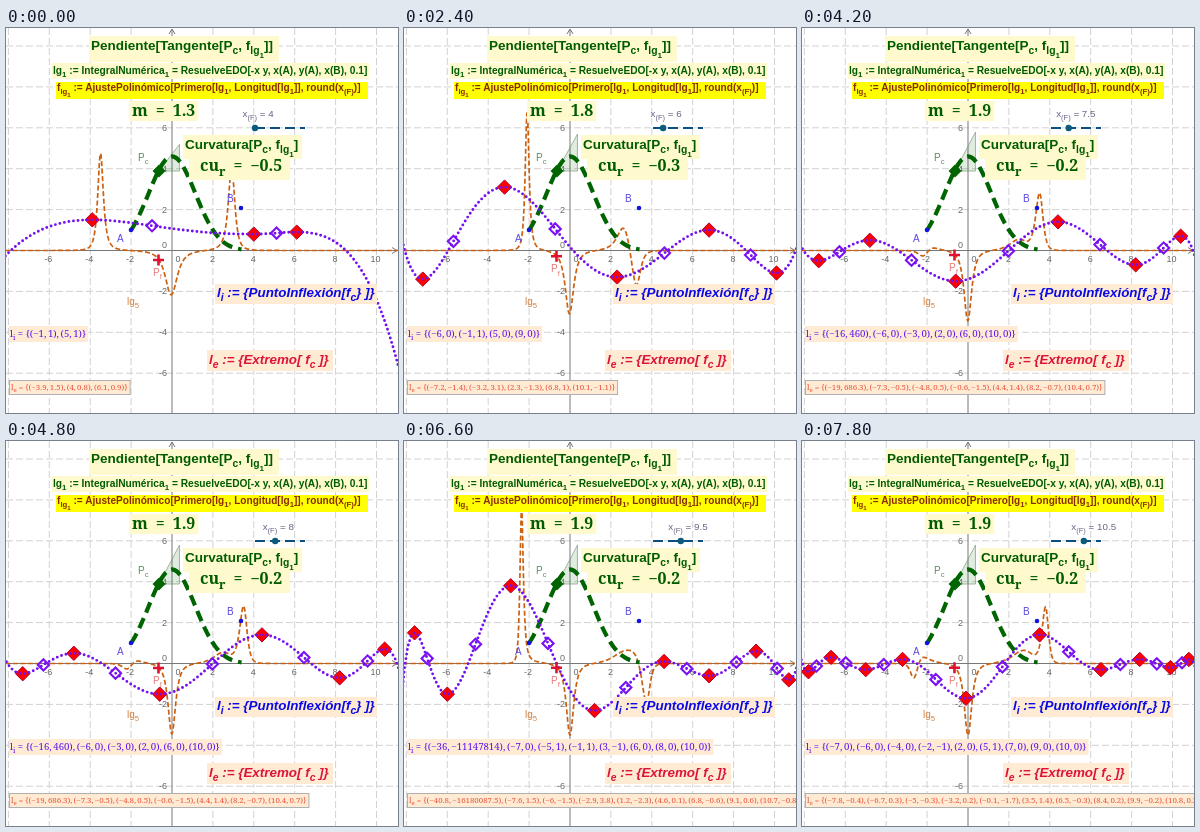
An HTML page that plays this animation: 392 by 385 pixels, repeating every 8000 ms.

```html
<!DOCTYPE html>
<html lang="es">
<head>
<meta charset="utf-8">
<style>
  html, body { margin: 0; width: 100%; height: 100%; overflow: hidden; background: #fff; }
  svg { display: block; width: 392px; height: 385px; }
  text { font-family: "Liberation Sans", Arial, sans-serif; white-space: pre; }
  .serif { font-family: "Noto Serif", serif; }
  .b { font-weight: bold; }
  .i { font-style: italic; }
  path { fill: none; }
  #grid { stroke: #d2d2d2; stroke-dasharray: 7 3; }
  #axes { stroke: #777; }
  #kappa { stroke: #cc6010; stroke-width: 1.7; stroke-dasharray: 5 2.5; }
  #bell { stroke: #006400; stroke-width: 4.2; stroke-dasharray: 11 6; }
  #curve { stroke: #7410f0; stroke-width: 2.9; stroke-linecap: round; stroke-dasharray: 0 4.6; }
  #peaks { fill: #f00; stroke: #b00030; }
  #bends { stroke: #7a12f2; stroke-width: 2.1; }
  #slope { fill: #006400; fill-opacity: .12; stroke: #7d977d; stroke-width: .7; }
  #point { fill: #006400; }
  #cross { stroke: #e01030; stroke-width: 2.6; }
  #slider { stroke: #0b4f80; stroke-width: 2.2; stroke-dasharray: 10 5; }
  .end { fill: #1414e0; }
</style>
</head>
<body>
<svg viewBox="0 0 392 385">
  <path id="grid"/><path id="axes"/><g id="ticks"></g>
  <path id="kappa"/><path id="slope"/><path id="bell"/>
  <path id="peaks"/><path id="bends"/><path id="curve"/>
  <path id="point" d="M153 136.500l6.500 6.500-6.500 6.500-6.500-6.500z"/>
  <path id="cross"/>
  <circle class="end" cx="125" cy="202" r="2.300"/>
  <circle class="end" cx="235" cy="180" r="2.300"/>
  <path id="slider" d="M249 100H299"/>
  <circle id="knob" cy="100" r="3.200" fill="#0b5c7c"/>
  <g id="labels"></g>
</svg>
<script>
const $ = id => document.getElementById(id);
const NS = 'http://www.w3.org/2000/svg';
const UNIT = 20.45, OX = 166, OY = 222.5, LEFT = -8.15, RIGHT = 11.1;
const px = x => OX + UNIT * x, py = y => OY - UNIT * y;
const set = (el, attrs) => { for (const k in attrs) el.setAttribute(k, attrs[k]); return el; };
const add = (parent, tag, attrs) => parent.appendChild(set(document.createElementNS(NS, tag), attrs));

// "|n" switches to subscript level n
function write(el, str) {
  const size = +el.getAttribute('font-size');
  const drop = [0, .32, .6], scale = [1, .77, .6];
  let level = 0;
  el.textContent = '';
  ('|0' + str).split('|').slice(1).forEach(part => {
    const next = +part[0];
    const span = add(el, 'tspan', { dy: (drop[next] - drop[level]) * size, 'font-size': scale[next] * size });
    span.textContent = part.slice(1);
    level = next;
  });
}
function label(str, x, y, size, fill, cls = '', parent = $('labels')) {
  const el = add(parent, 'text', { x, y, 'font-size': size, fill, class: cls });
  write(el, str);
  return el;
}
const box = (x, y, width, height, fill, stroke = 'none') =>
  add($('labels'), 'rect', { x, y, width, height, fill, stroke });

const toPath = pts => 'M' + pts.map(([x, y]) => px(x).toFixed(2) + ' ' + py(y).toFixed(2)).join('L');
const sample = (f, a, b, step) =>
  Array.from({ length: Math.ceil((b - a) / step) + 1 }, (_, i) => [a + i * step, f(a + i * step)]);
const diamonds = (pts, r) => pts.map(([x, y]) => `M${px(x)} ${py(y) - r}l${r} ${r}-${r} ${r}-${r}-${r}z`).join('');

const bell = x => 4.6 * Math.exp(-x * x / 2.62);
const nodes = sample(bell, -2, 3.4, .1);

// Least-squares polynomial through the bell; gives value, first and second derivative
function fitBell(degree) {
  const dot = (u, v) => u.reduce((s, e, i) => s + e * v[i], 0);
  const xs = nodes.map(p => p[0]), ys = nodes.map(p => p[1]), terms = [];
  let prev = xs.map(() => 0), cur = xs.map(() => 1), last = 1;
  for (let k = 0; k <= degree; k++) {
    const norm = dot(cur, cur);
    const a = dot(cur.map((c, i) => c * xs[i]), cur) / norm, b = k ? norm / last : 0;
    terms.push([a, b, dot(cur, ys) / norm]);
    [prev, cur] = [cur, cur.map((c, i) => (xs[i] - a) * c - b * prev[i])];
    last = norm;
  }
  return x => {
    let p = [1, 0, 0], old = [0, 0, 0], sum = [0, 0, 0];
    for (const [a, b, c] of terms) {
      sum = sum.map((s, i) => s + c * p[i]);
      [old, p] = [p, p.map((v, i) => (x - a) * v + (i && i * p[i - 1]) - b * old[i])];
    }
    return sum;
  };
}

// A polynomial is known from its extrema: they are the roots of its derivative
function throughExtrema(ext) {
  const rate = x => ext.reduce((p, [e]) => p * (x - e), 1);
  const walk = (a, b, n = 200) => {
    const h = (b - a) / n, pts = [[a, 0]];
    for (let i = 0, s = 0; i < n; i++) pts.push([a + (i + 1) * h, s += h * rate(a + (i + .5) * h)]);
    return pts;
  };
  const place = (pts, y, k) => pts.map(([x, s]) => [x, y + k * s]);
  const bends = [], gains = [];
  let pts = [];
  for (let i = 0; i + 1 < ext.length; i++) {
    const [[a, ya], [b, yb]] = ext.slice(i, i + 2);
    const raw = walk(a, b), k = (yb - ya) / raw[raw.length - 1][1];
    const gap = place(raw, ya, k);
    bends.push(gap.reduce((m, p) => Math.abs(rate(p[0])) > Math.abs(rate(m[0])) ? p : m));
    gains.push(k);
    pts = pts.concat(gap);
  }
  const first = ext[0], end = ext[ext.length - 1];
  if (first[0] > LEFT) pts = place(walk(first[0], LEFT), first[1], gains[0]).reverse().concat(pts);
  pts = pts.concat(place(walk(end[0], RIGHT), end[1], gains[gains.length - 1]));
  return { bends, pts: pts.filter(([x, y]) => x > LEFT - .2 && Math.abs(y) < 12) };
}

const list = pts =>
  ('{' + pts.map(p => `(${p.join()})`).join() + '}').replace(/-/g, '\u2212').replace(/,/g, ',\u2009');

// Extrema shown for each degree from 4 up
const scenes = [
  '-3.9,1.5 4,0.8 6.1,0.9',
  '-8.5,-0.4 -3.1,3.1 4.4,-1.4 9.4,1.4',
  '-7.2,-1.4 -3.2,3.1 2.3,-1.3 6.8,1 10.1,-1.1',
  '-7.3,-0.5 -4.8,0.5 -0.6,-1.5 4.4,1.4 8.2,-0.7 10.4,0.7',
  '-19,686.3 -7.3,-0.5 -4.8,0.5 -0.6,-1.5 4.4,1.4 8.2,-0.7 10.4,0.7',
  '-7.7,1.5 -6,-1.5 -3,3.6 1.1,-2.1 4.6,0 6.7,-0.5 9.1,0.5 10.7,-0.6',
  '-40.8,-16180087.5 -7.6,1.5 -6,-1.5 -2.9,3.8 1.2,-2.3 4.6,0.1 6.8,-0.6 9.1,0.6 10.7,-0.8',
  '-7.8,-0.4 -6.7,0.3 -5,-0.3 -3.2,0.2 -0.1,-1.7 3.5,1.4 6.5,-0.3 8.4,0.2 9.9,-0.2 10.8,0.2'
].map((str, i) => {
  const ext = str.split(' ').map(p => p.split(',').map(Number));
  const { bends, pts } = throughExtrema(ext);
  const fit = fitBell(i + 4);
  const curvature = x => { const [, d, dd] = fit(x); return dd / (1 + d * d) ** 1.5; };
  const atP = (153 - OX) / UNIT;
  return {
    paths: {
      curve: toPath(pts),
      peaks: diamonds(ext, 7.2),
      bends: diamonds(bends, 5.6),
      kappa: toPath(sample(curvature, LEFT, RIGHT, .02))
    },
    m: +fit(atP)[1].toFixed(1),
    cu: curvature(atP),
    extText: '|0l|1e|0 = ' + list(ext),
    bendText: '|0l|1i|0 = ' + list(bends.map(p => p.map(v => Math.round(v) || 0)))
  };
});

// Fixed scenery
let grid = '';
const tick = (n, x, y) => label('' + n, x, y, 9, '#666', '', $('ticks'));
for (let n = -8; n <= 10; n += 2) {
  if (!n) continue;
  grid += `M${px(n)} 0V385M0 ${py(n)}H392`;
  if (n > -8) tick(n, px(n) - (n < 0 ? 5 : n > 9 ? 6 : 3), 234);
  if (Math.abs(n) < 8) tick(n, n < 0 ? 153 : 156, py(n) + 3);
}
tick(0, 169.5, 234);
tick(0, 156, 220);
set($('grid'), { d: grid });
set($('axes'), { d: `M${OX} 385V1m-3 5l3-5 3 5M0 ${OY}H391m-5-3l5 3-5 3` });
set($('bell'), { d: toPath(nodes) });

const GREEN = '#005c00', CREAM = '#fffacd', PEACH = '#ffebd3';
label('P|1c', 132, 133, 10, '#5f8f5f');
label('A', 111, 214, 10, '#5a4ae0');
label('B', 221, 174, 10, '#5a4ae0');
label('lg|15', 121, 277, 10, '#d08040');
const crossLabel = label('P|1f', 147, 0, 10, '#e87878');
const knobLabel = label('', 0, 89, 9.8, '#668');

box(83, 8, 190, 26, CREAM);
label('Pendiente[Tangente[P|1c|0, f|1lg|21|0]]', 85, 22, 13.5, GREEN, 'b');
box(46, 35, 317, 16, CREAM);
label('lg|11|0 := IntegralNumérica|11|0 = ResuelveEDO[-x y, x(A), y(A), x(B), 0.1]', 47, 46, 10.2, GREEN, 'b');
box(50, 54, 312, 17, '#ff0');
label('f|1lg|21|0 := AjustePolinómico[Primero[lg|11|0, Longitud[lg|11|0]], round(x|1(F)|0)]', 51, 63, 10.1, '#8b2c00', 'b');
const slopeBox = box(123, 73, 70, 20, CREAM);
const slopeText = label('', 126, 88, 16, GREEN, 'serif b');
box(177, 107, 119, 24, CREAM);
box(183, 130, 101, 22, CREAM);
label('Curvatura[P|1c|0, f|1lg|21|0]', 179, 121, 13.5, GREEN, 'b');
const curvText = label('', 194, 143, 16, GREEN, 'serif b');
box(209, 256, 162, 20, PEACH);
label('l|1i|0 := {PuntoInflexión[f|1c|0} ]}', 211, 269, 13.4, '#0a0ae6', 'b i');
box(201, 322, 126, 21, PEACH);
label('l|1e|0 := {Extremo[ f|1c|0 ]}', 203, 336, 13.4, '#dc143c', 'b i');
const bendBox = box(3, 298, 80, 16, PEACH);
const bendText = label('', 4, 308.5, 9.6, '#5a10f0', 'serif');
const extBox = box(3.5, 352.5, 80, 14, PEACH, '#b0b0b0');
const extText = label('', 5, 361.5, 7.9, '#ea5038', 'serif');

const wrap = (rect, text, pad) => set(rect, { width: text.getComputedTextLength() + pad });

function draw(step) {
  const x = 4 + step / 2, s = scenes[Math.round(x) - 4];
  for (const id in s.paths) set($(id), { d: s.paths[id] });
  set($('slope'), { d: `M153 143h${UNIT}v${-UNIT * s.m}z` });
  const y = py(s.cu);
  set($('cross'), { d: `M147 ${y}h11m-5.5-5.500v11` });
  set(crossLabel, { y: y + 16 });
  const kx = 249 + (x - 4) * 5.05;
  set($('knob'), { cx: kx });
  set(knobLabel, { x: kx - 12.5 });
  write(knobLabel, `x|1(F)|0 = ${x}`);
  write(slopeText, `m\u2002=\u2002${s.m}`);
  write(curvText, `cu|1r|0\u2002=\u2002${s.cu.toFixed(1).replace('-', '\u2212')}`);
  write(bendText, s.bendText);
  write(extText, s.extText);
  wrap(slopeBox, slopeText, 6);
  wrap(bendBox, bendText, 3);
  wrap(extBox, extText, 4);
}

let shown = -1;
function frame() {
  const step = Math.floor(performance.now() % 8000 / 600);
  if (step !== shown) draw(shown = step);
  requestAnimationFrame(frame);
}
frame();
</script>
</body>
</html>
```
